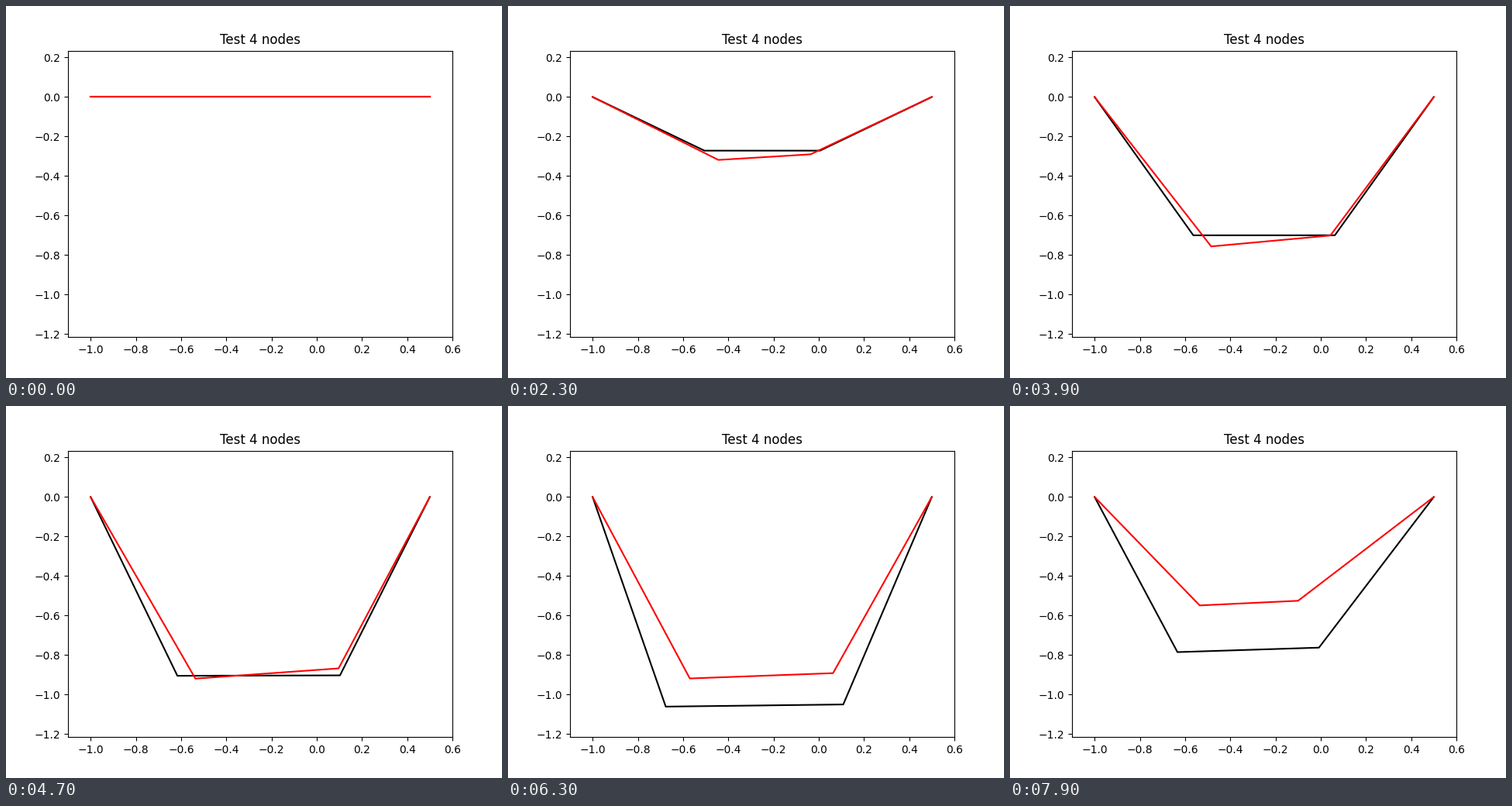
Animation, 640 px wide and 480 px high, one loop 8000 ms. Source, as a matplotlib script:

```python
import numpy as np
import matplotlib.pyplot as plt
from matplotlib.animation import FuncAnimation

FRAMES, STEP_MS = 80, 100


def swing(n, turn, *amps):
    """Harmonics of a motion that starts at rest and turns back at `turn`."""
    angle = np.pi * n / turn
    return sum(a * (1 - np.cos(k * angle)) for k, a in enumerate(amps, 1))


def drift(n):
    """Slow sideways slip that sets in once the chain is taut."""
    u = np.clip((n - 36) / 77, 0, 1)
    return u * u * (3 - 2 * u)


def chain(depth, middle, half, tilt):
    """Chain between its fixed ends; the left node hangs lower by the tilt."""
    return ([-1, middle - half, middle + half, 0.5],
            [0, -depth - tilt, -depth + tilt, 0])


def black_chain(n):
    slip = 0.1205 * drift(n)
    return chain(swing(n, 60.35, 0.5288, -0.0395, 0.0022),
                 -0.25 - slip,
                 0.25 + swing(n, 59, 0.07, -0.0268, 0.0036),
                 0.16 * slip)


def red_chain(n):
    slip = drift(n)
    return chain(swing(n, 55.4, 0.4779, -0.0273, 0.0018),
                 -0.25 - 0.15 * slip + swing(n, 55.4, 0.0209, -0.0028),
                 0.25 + swing(n, 55, 0.0425, -0.044, 0.0026),
                 0.02 * slip + swing(n, 40, 0.0138, -0.0015))


fig, ax = plt.subplots(figsize=(6.4, 4.8), dpi=100)
ax.set_xlim(-1.1, 0.6)
ax.set_ylim(-1.2149, 0.2345)
ax.set_title("Test 4 nodes")
black, = ax.plot([], [], color="black", lw=1.5)
red, = ax.plot([], [], color="red", lw=1.5)


def update(n):
    black.set_data(*black_chain(n))
    red.set_data(*red_chain(n))
    return black, red


anim = FuncAnimation(fig, update, frames=FRAMES, interval=STEP_MS,
                     repeat=True, repeat_delay=0)
plt.show()
```
